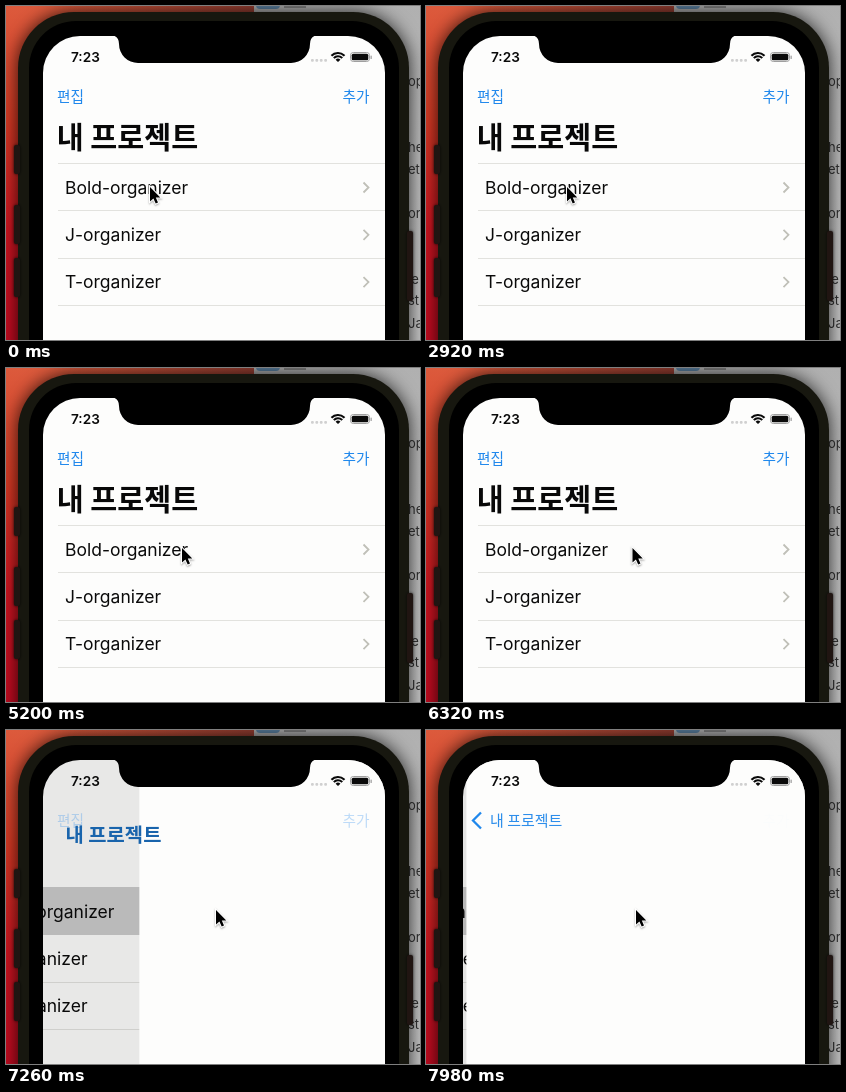
Recreate the animation shown at these times as an HTML page with a canvas. Size 414 px wide and 334 px high, loop 8000 ms.

```html
<!DOCTYPE html>
<html lang="ko">
<head>
<meta charset="utf-8">
<style>
  html, body { margin: 0; width: 414px; height: 334px; overflow: hidden; }
  canvas { display: block; }
</style>
</head>
<body>
<canvas id="stage" width="414" height="334"></canvas>
<script>
const c = document.getElementById('stage').getContext('2d');
const LATIN = 'Inter, sans-serif';
const KOREAN = '"Noto Sans CJK KR", "Noto Sans CJK", sans-serif';
const BLUE = [32, 136, 236], PAPER = '#fdfdfc', INK = '#0a0a0a';
const LEFT = 37, TOP = 30, WIDTH = 342;
const ROWS = ['Bold-organizer', 'J-organizer', 'T-organizer'];
const LOOP = 8000, PUSH = 6988, TAP = 6940;
// time, x, y of the pointer tip
const PATH = [[0, 144, 181], [1760, 144, 181], [1800, 149, 182], [2100, 151, 180],
  [2520, 151, 180], [3800, 108, 184], [5200, 176, 180], [6600, 210, 180], [8000, 210, 180]];

const clamp = v => Math.max(0, Math.min(1, v));
const mix = (a, b, k) => a + (b - a) * k;
const rgb = a => `rgb(${a.map(Math.round)})`;

function text(s, x, y, font, color, alpha = 1) {
  c.globalAlpha = alpha;
  c.font = font;
  c.fillStyle = color;
  c.fillText(s, x, y);
  c.globalAlpha = 1;
}
function rect(x, y, w, h, color) {
  c.fillStyle = color;
  c.fillRect(x, y, w, h);
}
function round(x, y, w, h, r, color) {
  c.beginPath();
  c.roundRect(x, y, w, h, r);
  c.fillStyle = color;
  c.fill();
}
function line(points, color, width) {
  c.beginPath();
  points.forEach(p => c.lineTo(...p));
  c.strokeStyle = color;
  c.lineWidth = width;
  c.stroke();
}
function gradient(x0, y0, x1, y1, ...stops) {
  const g = c.createLinearGradient(x0, y0, x1, y1);
  stops.forEach((s, i) => g.addColorStop(i / (stops.length - 1), s));
  return g;
}

function desktop() {
  rect(0, 0, 248, 334, gradient(0, 0, 0, 334, '#dc5a3c', '#d63a24', '#cc1420', '#c00a20'));
  rect(60, 0, 188, 40, gradient(60, 0, 248, 0, 'rgba(120,50,45,0)', 'rgba(120,50,45,.7)'));
  rect(248, 0, 166, 334, gradient(0, 0, 0, 334, '#b0b0b0', '#bcbcbc', '#c4c4c4'));
  round(250, -5, 24, 8, 4, '#5a80a0');
  rect(278, 0, 22, 2, '#808080');
  const words = [['op', 80], ['he', 146], ['et', 168], ['or', 212], ['le', 278], ['st', 299], ['Ja', 322]];
  words.forEach(([s, y]) => text(s, 402, y, '13px ' + LATIN, '#303030'));
}

function phone() {
  c.save();
  c.shadowColor = 'rgba(0,0,0,.8)';
  c.shadowBlur = 18;
  round(12, 6, 391, 400, 56, '#17170f');
  c.shadowBlur = 3;
  [[8, 139, 29], [8, 199, 39], [8, 252, 39], [401, 225, 70]]
    .forEach(([x, y, h]) => round(x, y, 6, h, 2, '#201512'));
  c.restore();
  round(23, 15, 370, 400, 47, '#000');
}

function list(p, tapped) {
  const shift = -0.3 * WIDTH * p;
  rect(LEFT, TOP, WIDTH, 310, PAPER);
  c.save();
  c.translate(shift, 0);
  if (tapped) rect(LEFT, 157, WIDTH, 48, '#cbcbcb');
  for (let i = 0; i < 4; i++) {
    if (!tapped || i > 1) rect(52, Math.round(157 + i * 47.4), 327, 1, '#e2e2de');
  }
  ROWS.forEach((s, i) => {
    const y = 181.5 + i * 47.3;
    text(s, 59, y + 6.2, '17.5px ' + LATIN, INK);
    line([[357.5, y - 5], [362.5, y], [357.5, y + 5]], '#c0c0b8', 1.8);
  });
  c.restore();
  rect(LEFT, TOP, WIDTH, 310, `rgba(0,0,0,${0.04 + 0.06 * p})`.replace(/[\d.]+\)$/, m => p ? m : '0)'));
}

function navBar(p) {
  const fade = 1 - p, blue = rgb(BLUE), k = p ** 1.3;
  text('편집', 51, 95.5, '14.7px ' + KOREAN, blue, fade);
  text('추가', 336.5, 95.5, '14.7px ' + KOREAN, blue, fade);

  const x = mix(50.7, 64.3, k), y = mix(142, 95.5, k), size = mix(29.3, 14.8, k);
  const bold = clamp(fade * 6), color = rgb([8, 8, 8].map((v, i) => mix(v, BLUE[i], p)));
  text('내 프로젝트', x, y, `bold ${size}px ${KOREAN}`, color, bold);
  text('내 프로젝트', x, y, `${size}px ${KOREAN}`, color, 1 - bold);

  c.globalAlpha = clamp((p - 0.88) * 10);
  line([[55, 82.5], [47, 90.5], [55, 98.5]], blue, 2.3);
  c.globalAlpha = 1;
}

function statusBar() {
  // notch with flared top corners
  c.beginPath();
  c.moveTo(105, 29);
  c.quadraticCurveTo(113, 30, 113, 38);
  c.arcTo(113, 57, 132, 57, 19);
  c.arcTo(304, 57, 304, 38, 19);
  c.lineTo(304, 38);
  c.quadraticCurveTo(304, 30, 312, 29);
  c.fillStyle = '#000';
  c.fill();

  text('7:23', 65, 56, '600 13.6px ' + LATIN, INK);
  for (let i = 0; i < 4; i++) round(305 + i * 4.4, 53, 2.8, 2.8, 1, '#d0d0d0');

  c.strokeStyle = INK;
  c.lineWidth = 2.1;
  [9, 5.7].forEach(r => {
    c.beginPath();
    c.arc(332, 56, r, -Math.PI * 0.76, -Math.PI * 0.24);
    c.stroke();
  });
  c.beginPath();
  c.moveTo(332, 56);
  c.arc(332, 56, 3.3, -Math.PI * 0.76, -Math.PI * 0.24);
  c.fillStyle = INK;
  c.fill();

  c.beginPath();
  c.roundRect(344.5, 46.5, 19, 9, 2.8);
  c.strokeStyle = '#a0a0a0';
  c.lineWidth = 1;
  c.stroke();
  round(345.7, 47.7, 16.6, 6.6, 1.6, INK);
  round(364.5, 49.5, 1.3, 3.5, 0.6, '#a0a0a0');
}

function pointer(t) {
  const i = PATH.findIndex(k => k[0] > t);
  const [a, b] = [PATH[i - 1], PATH[i]];
  const u = (t - a[0]) / (b[0] - a[0]), k = u * u * (3 - 2 * u);
  c.save();
  c.translate(mix(a[1], b[1], k), mix(a[2], b[2], k));
  c.beginPath();
  [[0, 0], [0, 14.5], [3.4, 11.4], [5.7, 16.6], [8, 15.6], [5.8, 10.6], [10.3, 10.6]]
    .forEach(p => c.lineTo(...p));
  c.closePath();
  c.shadowColor = 'rgba(0,0,0,.35)';
  c.shadowBlur = 2;
  c.shadowOffsetY = 1;
  c.strokeStyle = '#fff';
  c.lineWidth = 2;
  c.stroke();
  c.shadowColor = 'transparent';
  c.fillStyle = '#000';
  c.fill();
  c.restore();
}

function draw(now) {
  const t = now % LOOP;
  const p = t < PUSH ? 0 : 1 - Math.exp(-4.64 * (t - PUSH) / 1000);
  desktop();
  phone();
  c.save();
  c.beginPath();
  c.roundRect(LEFT, TOP, WIDTH, 400, 37);
  c.clip();
  list(p, t >= TAP);
  if (p) rect(LEFT + WIDTH * (1 - p), TOP, WIDTH, 310, PAPER);
  navBar(p);
  statusBar();
  c.restore();
  pointer(t);
}

const start = performance.now();
function tick() {
  draw(performance.now() - start);
  requestAnimationFrame(tick);
}
tick();
</script>
</body>
</html>
```
